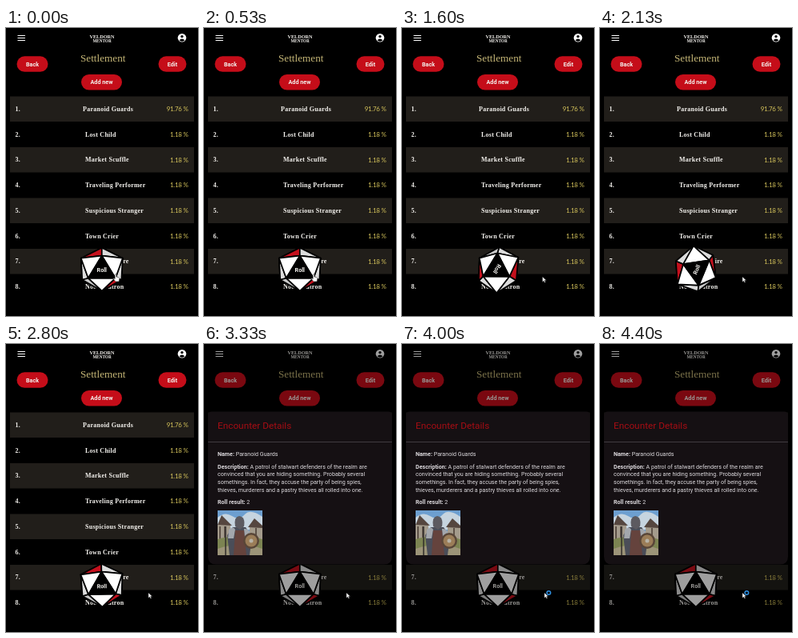
These frames come from a looping animation (240 px wide and 360 px high, 4470 ms). An HTML page:

```html
<!DOCTYPE html>
<html lang="en">
<head>
<meta charset="utf-8">
<title>Encounter roller</title>
<style>
html, body { margin: 0; width: 100%; height: 100%; overflow: hidden; background: #000; }
svg { display: block; width: 100vw; height: 100vh; }
text { fill: #f4f2ee; }
.serif { font-family: "Liberation Serif", serif; }
.row { font: bold 8px "Liberation Serif", serif; letter-spacing: .25px; }
.pct { font: 8px Lato, sans-serif; letter-spacing: -.3px; fill: #d8c65c; text-anchor: end; }
.btn { font: bold 7.2px Roboto, sans-serif; text-anchor: middle; }
.body { font: 7.15px Roboto, sans-serif; }
.body text { fill: #dddade; }
.b { font-weight: bold; }
</style>
</head>
<body>
<svg viewBox="0 0 240 360" preserveAspectRatio="none">
  <rect width="240" height="360"/>
  <path d="M14.5 9.5h9.5M14.5 12.5h9.5M14.5 15.5h9.5" stroke="#fff" stroke-width="1.1"/>
  <g class="serif b" text-anchor="middle">
    <text x="120" y="13" font-size="6.2">VELDORN</text>
    <text x="120" y="18" font-size="5.2">MENTOR</text>
  </g>
  <text class="serif" x="121.2" y="42.2" font-size="13.2" text-anchor="middle" style="fill:#c6b777">Settlement</text>
  <circle cx="220" cy="12.3" r="5.3" fill="#fff"/>
  <circle cx="220" cy="10.6" r="1.7"/>
  <path d="M216.6 15.2q3.4-3.4 6.8 0q-3.4 3.2-6.8 0"/>
  <g id="buttons"></g>
  <g id="rows"></g>
  <g id="die" stroke="#000" stroke-width="1.7" stroke-linejoin="round"></g>
  <rect id="dim" width="240" height="360" opacity="0"/>

  <g id="modal" class="body" opacity="0">
    <path d="M10 84.5h220q5 0 5 5v176q0 10-10 10H15q-10 0-10-10v-176q0-5 5-5" fill="#151013"/>
    <text x="17" y="106" font-size="11.8" style="fill:#a50d14">Encounter Details</text>
    <path d="M5 122.5h230" stroke="#4b464c" stroke-width=".8"/>
    <text x="17" y="140.2"><tspan class="b">Name:</tspan> Paranoid Guards</text>
    <text x="17" y="155.6"><tspan class="b">Description:</tspan> A patrol of stalwart defenders of the realm are</text>
    <text x="17" y="165.4">convinced that you are hiding something. Probably several</text>
    <text x="17" y="175.2">somethings. In fact, they accuse the party of being spies,</text>
    <text x="17" y="185">thieves, murderers and a pastry thieves all rolled into one.</text>
    <text x="17" y="200.3"><tspan class="b">Roll result:</tspan> 2</text>
    <svg x="17" y="208" width="56" height="56" viewBox="0 0 56 56">
      <rect width="56" height="56" fill="#6d9fd0"/>
      <path d="M0 9q9-8 18-2t16-2 22 3v16H0z" fill="#c6d4df"/>
      <path d="M0 18h16v22H0zM40 20h16v18H40z" fill="#a49b8c"/>
      <path d="M0 18l5-12 13 13zM38 21l8-11 10 9v3z" fill="#55463f"/>
      <path d="M3 20v18M9 20v18M48 22v14" stroke="#4d4038" stroke-width="1.6"/>
      <path d="M0 36q28-8 56 0v20H0z" fill="#7c8452"/>
      <path d="M0 48q28-10 56 0v8H0z" fill="#9c9478"/>
      <path d="M15 56l-3-25 7-10h16l8 12-3 23z" fill="#4a4d58"/>
      <path d="M14 24q6-5 8 0l-2 11h-7zM33 23q6-1 8 6l-2 8h-5z" fill="#a3a7ad"/>
      <path d="M22 25h11l3 31H20z" fill="#65433d"/>
      <path d="M22 20q-2-12 5-13 8 1 6 13l-5 4z" fill="#5c5a60"/>
      <path d="M10 20v36" stroke="#302c2a" stroke-width="1.5"/>
      <circle cx="42" cy="38" r="10" fill="#594638"/>
      <circle cx="42" cy="38" r="7.5" fill="#9b7d58"/>
      <circle cx="42" cy="38" r="2.5" fill="#b7b2a6"/>
    </svg>
  </g>

  <g id="cursor">
    <path id="arrow" d="M0 0v6.4l1.6-1.4 1.1 2.3 1.1-.5-1.1-2.3h2.1z" fill="#fff" stroke="#222" stroke-width=".4"/>
    <path id="hand" d="M-.8 0q.9-1.1 1.7 0v3.1l3.3.8q.8.3.6 1.4l-.7 3.6h-4.2l-2.7-3.5q.4-1.2 2 .1z" fill="#fff" stroke="#222" stroke-width=".5"/>
    <circle id="busy" cx="5.4" cy="0" r="2.3" fill="none" stroke="#2f8fe0" stroke-width="1.5"/>
  </g>
</svg>
<script>
const LOOP = 4470;
const $ = id => document.getElementById(id);
const clamp = v => Math.max(0, Math.min(1, v));
const span = (t, a, b) => clamp((t - a) / (b - a));
const smooth = p => p * p * (3 - 2 * p);

// cubic-bezier(.25, .1, .25, 1)
function ease(x) {
  const bez = (u, a, b) => 3 * u * (1 - u) ** 2 * a + 3 * u * u * (1 - u) * b + u ** 3;
  let lo = 0, hi = 1;
  for (let i = 0; i < 24; i++) {
    const mid = (lo + hi) / 2;
    if (bez(mid, .25, .25) < x) lo = mid; else hi = mid;
  }
  return bez(lo, .1, 1);
}

function button(label, x, y, w) {
  return `<rect x="${x}" y="${y}" width="${w}" height="19.5" rx="9.75" fill="#c50d19"/>
    <text class="btn" x="${x + w / 2}" y="${y + 12.3}">${label}</text>`;
}
$("buttons").innerHTML = button("Back", 13.5, 35.3, 39) + button("Edit", 190.5, 35.3, 35) + button("Add new", 94, 58, 51);

const names = ["Paranoid Guards", "Lost Child", "Market Scuffle", "Traveling Performer",
  "Suspicious Stranger", "Town Crier", "House on Fire", "Noble Patron"];
$("rows").innerHTML = names.map((name, i) => {
  const y = 85.5 + i * 31.75;
  const stripe = i % 2 ? "" : `<rect x="5" y="${y}" width="230" height="31.5" fill="#211e1a"/>`;
  const x = i === 0 ? 96 : i === 6 ? 102.5 : 99;
  return `${stripe}<text class="row" x="11.5" y="${y + 18.3}">${i + 1}.</text>
    <text class="row" x="${x}" y="${y + 18.3}">${name}</text>
    <text class="pct" x="227.5" y="${y + 18.6}">${i ? "1.18" : "91.76"} %</text>`;
}).join("");

const hex = [[0, -27], [26, -14], [24.5, 13], [0, 27], [-24.5, 13], [-26, -14]];
const [peak, tr, br, bottom, bl, tl] = hex;
const up = [0, -17], right = [17, 11], left = [-17, 11];
const face = (fill, ...pts) => `<polygon points="${pts.join(" ")}" fill="${fill}"/>`;
$("die").innerHTML =
  face("#000", ...hex) +
  face("#c5101d", peak, tl, up) + face("#dcdcdc", peak, tr, up) +
  face("#dcdcdc", tl, bl, left) + face("#c8c8c8", bl, bottom, left) +
  face("#dcdcdc", tr, br, right) + face("#c5101d", br, bottom, right) +
  face("#fff", tl, up, left) + face("#fff", tr, up, right) + face("#fff", left, right, bottom) +
  face("#000", up, right, left) +
  `<text class="btn" y="3.6" stroke="none">Roll</text>`;

const show = (id, on) => $(id).setAttribute("visibility", on ? "visible" : "hidden");

function draw(t) {
  const angle = 720 * ease(span(t, 750, 2930));
  $("die").setAttribute("transform", `translate(119.8 301.7) rotate(${angle})`);

  const open = smooth(span(t, 3000, 3300));
  $("dim").setAttribute("opacity", .38 * open);
  $("modal").setAttribute("opacity", open);

  const away = smooth(span(t, 800, 1100)), drift = smooth(span(t, 1300, 2000));
  const x = 137 + 37 * away + 4 * drift;
  const y = 308 + 3 * away;
  $("cursor").setAttribute("transform", `translate(${x} ${y})`);
  show("hand", x < 146);
  show("arrow", x >= 146);
  show("busy", t >= 3800);
}

const start = performance.now();
function tick() {
  draw((performance.now() - start) % LOOP);
  requestAnimationFrame(tick);
}
draw(0);
requestAnimationFrame(tick);
</script>
</body>
</html>
```
